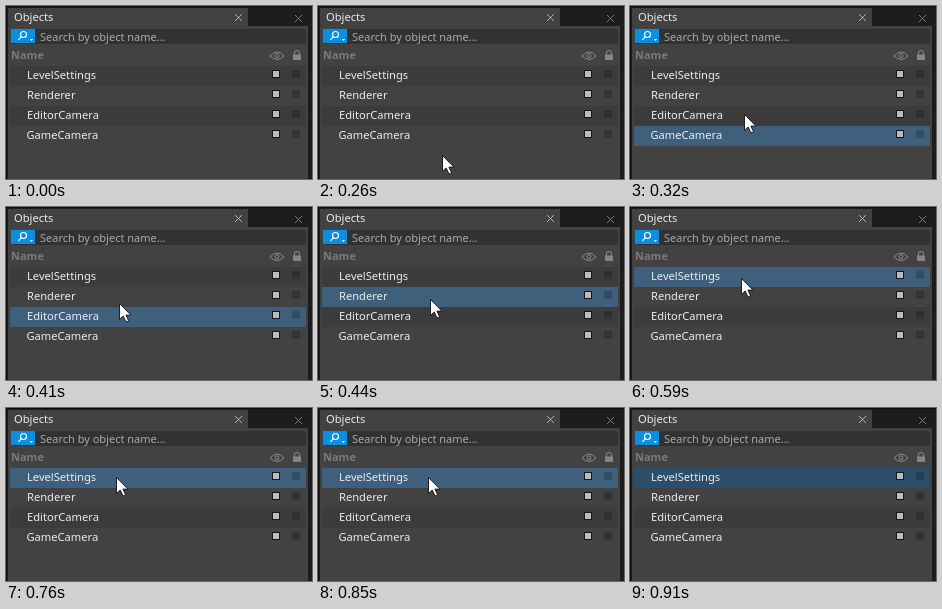
Animation, 306 px wide and 173 px high, one loop 2000 ms. Source, as an HTML page:

```html
<!DOCTYPE html>
<html lang="en">
<head>
<meta charset="utf-8">
<title>Objects panel</title>
<style>
html, body { margin: 0; width: 100%; height: 100%; overflow: hidden; background: #1d1d1d; }
svg { display: block; width: 306px; height: 173px; }
text { font: 11.15px "Noto Sans", sans-serif; fill: #ececec; }
.hint { font-size: 11px; fill: #a9a9a9; }
.head { font-size: 11px; font-weight: 700; fill: #7a7a7a; }
.line { fill: none; stroke: #b4b4b4; }

#bar, #pointer { animation: 2s step-end -1ms infinite; }
#bar { animation-name: hover; }
#pointer { animation-name: move; }

@keyframes hover {
  0%    { opacity: 0; transform: translateY(60px); fill: #3f607d; }
  14.5% { opacity: 1; transform: translateY(120px); fill: #3f607d; }
  17.5% { opacity: 1; transform: translateY(100px); fill: #3f607d; }
  22%   { opacity: 1; transform: translateY(80px); fill: #3f607d; }
  28%   { opacity: 1; transform: translateY(60px); fill: #3f607d; }
  45.5%, 100% { opacity: 1; transform: translateY(60px); fill: #2b4f6b; }
}
@keyframes move {
  0%    { opacity: 0; transform: translate(124px, 149px); }
  13%   { opacity: 1; transform: translate(124px, 149px); }
  14.5% { opacity: 1; transform: translate(117px, 126px); }
  16%   { opacity: 1; transform: translate(114px, 108px); }
  17.5% { opacity: 1; transform: translate(114px, 104px); }
  19%   { opacity: 1; transform: translate(113px, 100px); }
  20.5% { opacity: 1; transform: translate(113px, 96px); }
  22%   { opacity: 1; transform: translate(112px, 92px); }
  23.5% { opacity: 1; transform: translate(112px, 86px); }
  25%   { opacity: 1; transform: translate(111px, 80px); }
  26.5% { opacity: 1; transform: translate(111px, 75px); }
  28%   { opacity: 1; transform: translate(111px, 73px); }
  29.5% { opacity: 1; transform: translate(111px, 71px); }
  38%   { opacity: 1; transform: translate(110px, 69px); }
  45.5%, 100% { opacity: 0; transform: translate(110px, 69px); }
}
</style>
</head>
<body>
<svg viewBox="0 0 306 173">
  <defs>
    <path id="close" d="M0 0l7 7M7 0l-7 7"/>
    <g id="boxes">
      <path d="M266 4h8v8h-8z" fill="#171717"/>
      <path d="M267 5h6v6h-6z" fill="#bcbcbc"/>
      <path d="M286 4h8v8h-8z" opacity=".2"/>
    </g>
  </defs>

  <path d="M0 0h306v173H0z" fill="#0c0c0c"/>
  <path d="M1 1h305v172H1z" fill="#1d1d1d"/>
  <path d="M2 20h300v153H2zM2 2h240v19H2z" fill="#424242"/>
  <use href="#close" x="229" y="8" class="line"/>
  <use href="#close" x="289" y="9" class="line" style="stroke:#777"/>
  <text x="8" y="15">Objects</text>

  <rect x="5" y="23" width="295" height="15" rx="2" fill="#323232"/>
  <rect x="5" y="23" width="24" height="14" fill="#0b8fe0"/>
  <g fill="none" stroke="#fff" stroke-width="1.2">
    <circle cx="17.5" cy="28.5" r="3"/>
    <path d="M15.3 30.8l-3 3"/>
  </g>
  <path d="M24 33h3l-1.5 2z" fill="#fff"/>
  <text x="34" y="35" class="hint">Search by object name...</text>

  <text x="5" y="53" class="head">Name</text>
  <g class="line" style="stroke:#8c8c8c">
    <path d="M264 50q7-8 14 0q-7 7-14 0z"/>
    <circle cx="271" cy="49.7" r="1.9"/>
    <path d="M288.5 49v-2a2.5 2.5 0 0 1 5 0v2"/>
  </g>
  <path d="M287 48.5h8v5.5h-8z" fill="#858585"/>

  <path d="M4 60h296v20H4zM4 100h296v20H4z" fill="#3c3c3c"/>
  <rect id="bar" x="4" width="296" height="20"/>
  <use href="#boxes" y="60"/>
  <use href="#boxes" y="80"/>
  <use href="#boxes" y="100"/>
  <use href="#boxes" y="120"/>
  <text x="21" y="73">LevelSettings</text>
  <text x="21" y="93">Renderer</text>
  <text x="21" y="113">EditorCamera</text>
  <text x="20.5" y="133">GameCamera</text>

  <path id="pointer" d="M.5.5v16l3.7-3.5 2.8 6 2.6-1.2-2.7-5.7h5z" fill="#fff" stroke="#111" stroke-width=".9"/>
</svg>
</body>
</html>
```
